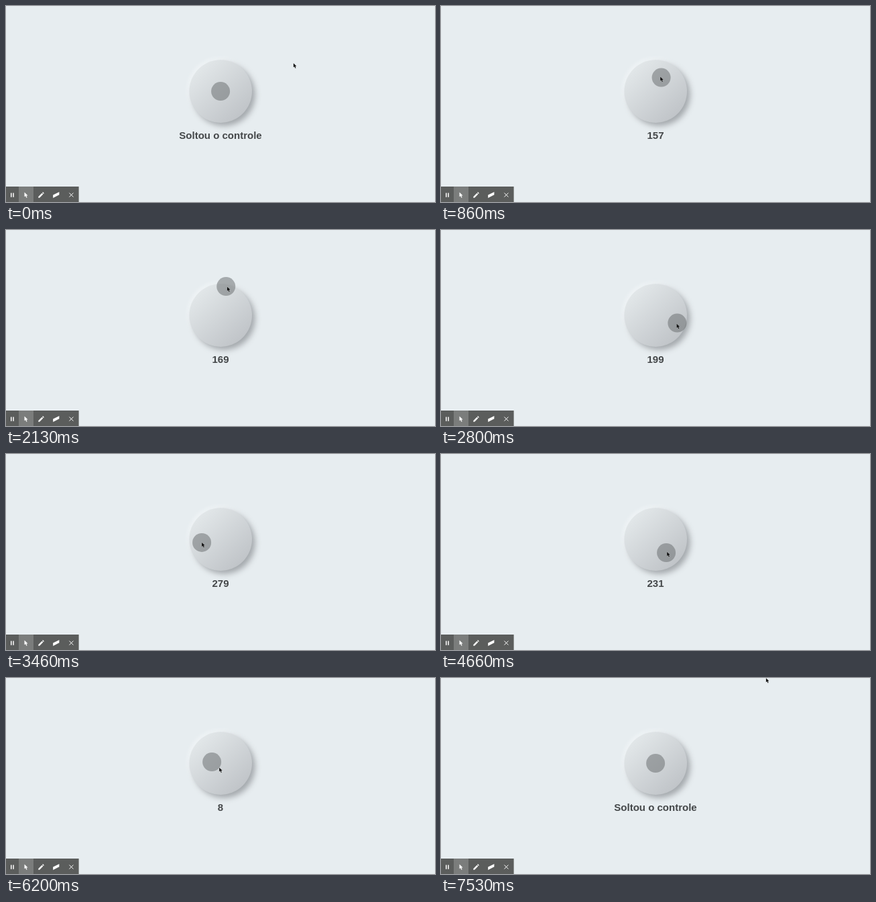
Animation, 640 px wide and 292 px high, one loop 8600 ms. Source, as an HTML page:

```html
<!DOCTYPE html>
<html lang="pt">
<head>
<meta charset="utf-8">
<title>Controle</title>
<style>
  html, body { margin: 0; width: 100%; height: 100%; overflow: hidden; background: #e7edf0; }
  svg { display: block; width: 100%; height: 100%; }
  #label { font: bold 15px "Liberation Sans", Arial, sans-serif; fill: #444749; text-anchor: middle; }
  .dial { filter: drop-shadow(5px 5px 4px #a3a8ac) drop-shadow(-2px -2px 3px #f2f6f8); }
</style>
</head>
<body>
<svg viewBox="0 0 640 292">
  <defs>
    <linearGradient id="shade" x1=".15" y1=".12" x2=".85" y2=".88">
      <stop offset="0" stop-color="#e2e7e9"/>
      <stop offset="1" stop-color="#c0c4c8"/>
    </linearGradient>
    <path id="arrow" d="M0 0V6L1.5 4.8L2.6 7.4L3.7 6.9L2.6 4.4H4.6Z"/>
  </defs>

  <circle class="dial" cx="320.2" cy="127.1" r="46.8" fill="url(#shade)"/>
  <circle id="knob" r="14" fill="#64686a" fill-opacity=".5"/>
  <text id="label" x="320" y="198"></text>

  <g id="toolbar" fill="#fff">
    <path d="M0 269H108.6V292H0Z" fill="#5b5d5c"/>
    <path d="M19 269H41V292H19Z" fill="#7b7d7c"/>
    <path d="M7 278.4h1.5v6.4H7ZM10.3 278.4h1.5v6.4h-1.5Z"/>
    <use href="#arrow" transform="translate(27.5 277.6) scale(1.1)"/>
    <path d="M48.3 285.7v-1.8l5.2-5.2 1.8 1.8-5.2 5.2ZM54.1 278.1l1-1 1.8 1.8-1 1Z"/>
    <path d="M70.2 286v-4.4l9.2-4.6v4.2Z"/>
    <path d="M94.4 278.5l6 6M100.4 278.5l-6 6" stroke="#fff"/>
  </g>

  <use id="cursor" href="#arrow" fill="#111" stroke="#fff" stroke-opacity=".4" stroke-width=".5" paint-order="stroke"/>
</svg>

<script>
const LOOP = 8600, FPS = 15;
const CENTER = { x: 320.1, y: 127.1 };
const GRAB = 11, RELEASE = 104; // ticks

// Where the hand slows down or turns, around the dial: [tick, degrees, radius]
const poses = [
  [2, -21, 116.5], [12, -67.5, 22.2],
  [21, -191, 36.5], [31, -79.3, 43.8], [42, 22, 34], [51, 170.2, 28.4],
  [59, 170.2, 28.4], [69, 51.4, 25.6], [80, -105, 18], [88, 0, 40],
  [92, -171.3, 13.1], [93, -253, 6.7], [104, -397.6, 8], [113, -397.6, 208]
];

const clamp = u => Math.min(1, Math.max(0, u));
const smooth = u => u * u * (3 - 2 * u);

function pointerAt(tick) {
  const i = Math.max(1, poses.findIndex(([time]) => time > tick));
  const next = tick >= poses.at(-1)[0] ? poses.length - 1 : i;
  const [t0, deg0, r0] = poses[next - 1], [t1, deg1, r1] = poses[next];
  const u = smooth(clamp((tick - t0) / (t1 - t0)));
  const angle = (deg0 + (deg1 - deg0) * u) * Math.PI / 180;
  const radius = r0 + (r1 - r0) * u;
  return { x: CENTER.x + radius * Math.cos(angle), y: CENTER.y + radius * Math.sin(angle) };
}

// Each quadrant adds 90 degrees, starting at the upper left
function reading({ x, y }) {
  const dx = x - CENTER.x, dy = y - CENTER.y;
  const quadrant = dy < 0 ? (dx < 0 ? 0 : 1) : (dx < 0 ? 3 : 2);
  return Math.floor(quadrant * 90 + Math.atan2(Math.abs(dy), Math.abs(dx)) * 180 / Math.PI);
}

const knob = document.getElementById("knob");
const label = document.getElementById("label");
const cursor = document.getElementById("cursor");
const moveTo = (el, { x, y }) => el.setAttribute("transform", `translate(${x} ${y})`);

function draw(time) {
  const tick = Math.floor((time % LOOP + 7) * FPS / 1000);
  const held = tick >= GRAB && tick < RELEASE;
  const spot = held ? pointerAt(tick - 1) : CENTER; // the knob trails by one tick
  moveTo(knob, spot);
  moveTo(cursor, pointerAt(tick));
  label.textContent = held ? reading(spot) : "Soltou o controle";
}

const start = performance.now();
function loop() {
  draw(performance.now() - start);
  requestAnimationFrame(loop);
}
loop();
</script>
</body>
</html>
```
